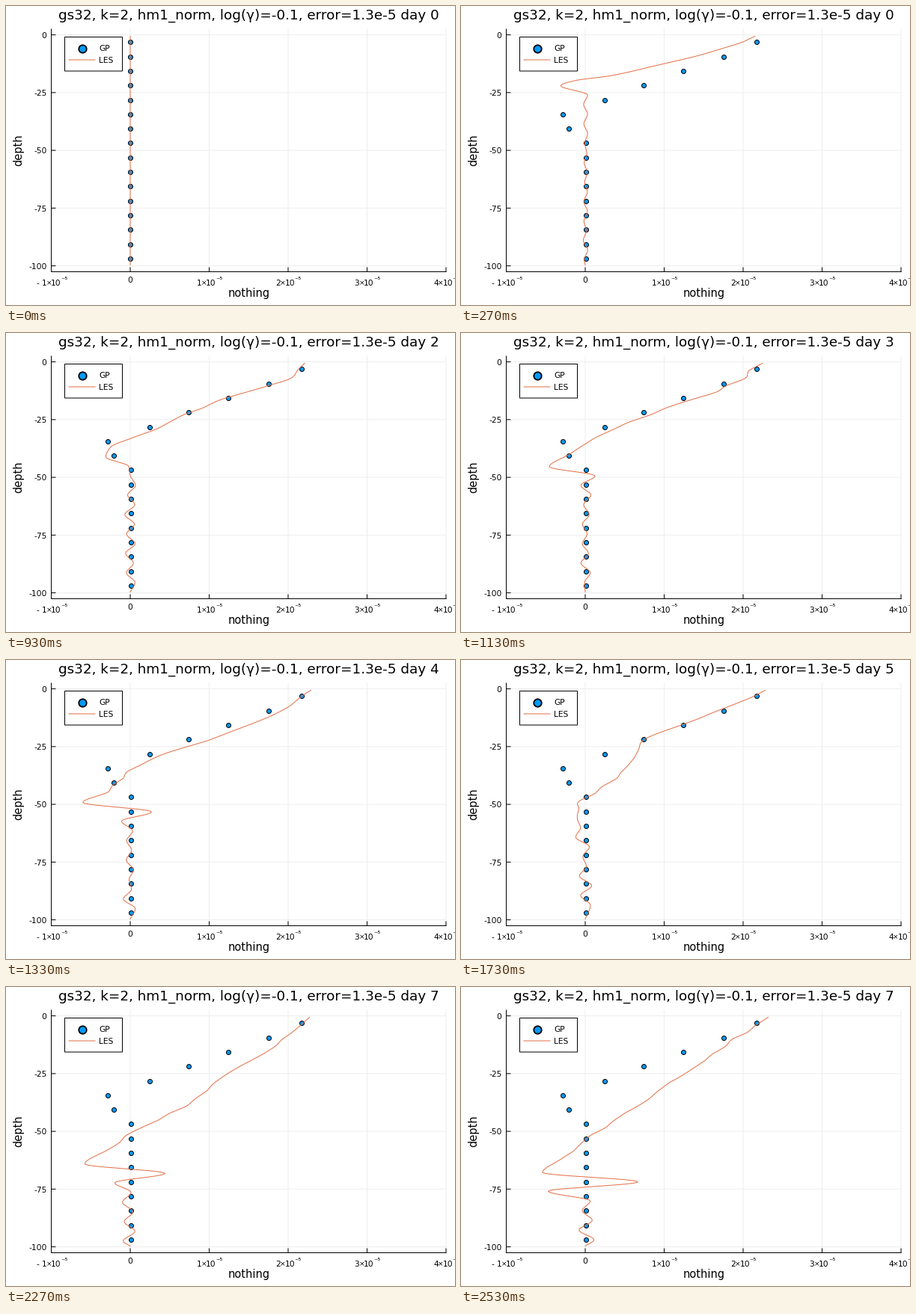
Animation of 600x400 px, one loop 2590 ms. Source, as a matplotlib script:

```python
import numpy as np
import matplotlib.pyplot as plt
from matplotlib.animation import FuncAnimation
from matplotlib.patches import Rectangle

PX = 0.72                      # points per pixel at 100 dpi
LEFT, RIGHT, TOP, BOTTOM = 60.5, 588, 31, 355.5
ZERO, UNIT = 166, 105.5        # x of 0, width of 1e-5
SURFACE, METRE = 38.6, 3.09    # y of depth 0, height of one metre
BLUE, ORANGE = "#009afa", "#e36f47"
LOOP, STEP = 2590, 10          # ms
STATES = 39

plt.rcParams["font.family"] = "DejaVu Sans"
fig = plt.figure(figsize=(6, 4), dpi=100, facecolor="white")
ax = fig.add_axes([0, 0, 1, 1])
ax.set_xlim(0, 600)
ax.set_ylim(400, 0)
ax.axis("off")


def line(xs, ys, color="black", width=1, **kw):
    return ax.plot(xs, ys, color=color, lw=width * PX, snap=False, **kw)[0]


def text(x, y, s, size=10.67, ha="left", va="baseline", **kw):
    return ax.text(x, y, s, fontsize=size * PX, ha=ha, va=va, **kw)


def dots(xs, ys, size, edge, z):
    return ax.plot(xs, ys, "o", ms=size * PX, mfc=BLUE, mec="black",
                   mew=edge * PX, snap=False, zorder=z)[0]


def power_label(x, digit, sign=""):
    """Tick label such as 2×10⁻⁵ with a compact cross."""
    x += 4 if sign else 0
    if sign:
        text(x - 24.5, 374, sign)
    text(x - 17, 374, digit)
    text(x - 10.8, 373.6, "×", 9)
    text(x - 4.2, 374, "10")
    text(x + 8.5, 370.5, "⁻⁵", 10)


# Grid, axes and ticks
for i in range(5):
    y = SURFACE + 25 * i * METRE
    line([LEFT, RIGHT], [y, y], "#eeeeee", zorder=0)
    line([LEFT, LEFT + 5.5], [y, y], zorder=2)
    text(54.5, y + 4.2, str(-25 * i), ha="right")
for i in range(-1, 5):
    x = ZERO + UNIT * i
    line([x, x], [TOP, BOTTOM], "#eeeeee", zorder=0)
    line([x, x], [BOTTOM, BOTTOM - 5.5], zorder=2)
    if i == 0:
        text(x, 370, "0", ha="center")
    else:
        power_label(x, str(abs(i)), "-" if i < 0 else "")
line([LEFT, LEFT, RIGHT], [TOP, BOTTOM, BOTTOM], zorder=2)
text(324.3, 388.5, "nothing", 14.67, "center")
text(16.5, 192.5, "depth", 14.67, "center", "center", rotation=90)
title = text(324.3, 18, "", 18.4, "center")

# Legend
ax.add_patch(Rectangle((78.5, 41.5), 77, 45.5, fc="white", ec="black",
                       lw=PX, snap=False, zorder=6))
dots([101.5], [56.5], 10.4, 1.8, 7)
line([84, 119], [72, 72], ORANGE, zorder=7)
text(124, 60.5, "GP", zorder=7)
text(124, 76, "LES", zorder=7)

# Values in 1e-6 at fractions of the mixed layer, then the spike and the
# rebound below it, for a few states
FRACTIONS = np.array([0.015, 0.2, 0.4, 0.6, 0.8, 0.9, 1])
SHAPES = {
    8: [22.2, 18.6, 14.7, 9.2, 3.5, -1.3, -3.1, 0.3, -0.2],
    14: [22.3, 19.1, 11.5, 6.1, 0.2, -2.5, -3.1, -0.2, 0],
    20: [22.6, 19.1, 12.1, 3.4, -1.4, -2.6, -6, 2.7, -1.1],
    26: [22.7, 15.5, 7.5, 5.7, 1.3, -1, -1, -0.6, -1.2],
    31: [22.4, 19.1, 12.8, 8, -0.2, -3.1, -6, 2.7, 0.1],
    38: [22.8, 17.4, 11.5, 6.1, -0.1, -2.3, -5.4, 6.7, -4.7],
}
YS = np.linspace(40.5, 346.5, 256)


def smooth(py, px, y):
    """Monotone cubic through the points, x as a function of y."""
    h = np.diff(py)
    s = np.diff(px) / h
    a, b = s[:-1], s[1:]
    rising = a * b > 0
    inner = np.where(rising, 2 * a * b / np.where(rising, a + b, 1), 0)
    m = np.concatenate([s[:1], inner, s[-1:]])
    i = np.clip(np.searchsorted(py, y, side="right") - 1, 0, len(h) - 1)
    t = (y - py[i]) / h[i]
    return (px[i] * (1 + 2 * t) * (1 - t) ** 2 + px[i + 1] * t * t * (3 - 2 * t)
            + h[i] * (m[i] * t * (1 - t) ** 2 - m[i + 1] * t * t * (1 - t)))


def profile(k):
    if k == 0:
        return np.full_like(YS, ZERO)
    rng = np.random.default_rng(k)
    # the mixed layer deepens with the square root of time
    front = SURFACE + 34 * np.sqrt(k)
    shape = [np.interp(k, list(SHAPES), col) for col in zip(*SHAPES.values())]

    # weak alternating waves below the layer, growing with time
    deep = np.arange(front + 38, 340, 13)
    waves = rng.uniform(0.1, 1.1, len(deep)) * (-1) ** np.arange(len(deep))
    waves *= (0.5 + 0.015 * k) * min(1, k / 8)

    py = np.concatenate([SURFACE + FRACTIONS * (front - SURFACE),
                         [front + 12.5, front + 25], deep, [YS[-1]]])
    px = np.concatenate([shape, waves, [0]])
    x = ZERO + UNIT / 10 * smooth(py, px, YS)

    # small turbulent wiggle inside the layer
    knots = np.linspace(YS[0], YS[-1], 32)
    wiggle = rng.normal(0, 2.5, 32) * (knots < front - 10)
    return x + smooth(knots, wiggle, YS)


CURVES = [profile(k) for k in range(STATES)]
GP_Y = SURFACE + METRE * (3.125 + 6.25 * np.arange(16))
GP_X = ZERO + UNIT / 10 * np.r_[21.66, 17.58, 12.46, 7.37, 2.51, -2.84, -2.09,
                                np.full(9, 0.05)]
gp = dots(np.full(16, ZERO), GP_Y, 6, 1, 4)
les = line(CURVES[0], YS, ORANGE, zorder=5)


def draw(n):
    k = (n * STEP + 5) * 3 // 200          # 15 states a second
    day = 5 * k // 24                      # five hours per state
    title.set_text(f"gs32, k=2, hm1_norm, log(γ)=-0.1, error=1.3e-5 day {day}")
    gp.set_xdata(GP_X if k else np.full(16, ZERO))
    les.set_xdata(CURVES[k])
    return title, gp, les


anim = FuncAnimation(fig, draw, frames=LOOP // STEP, interval=STEP, repeat=True)
plt.show()
```
